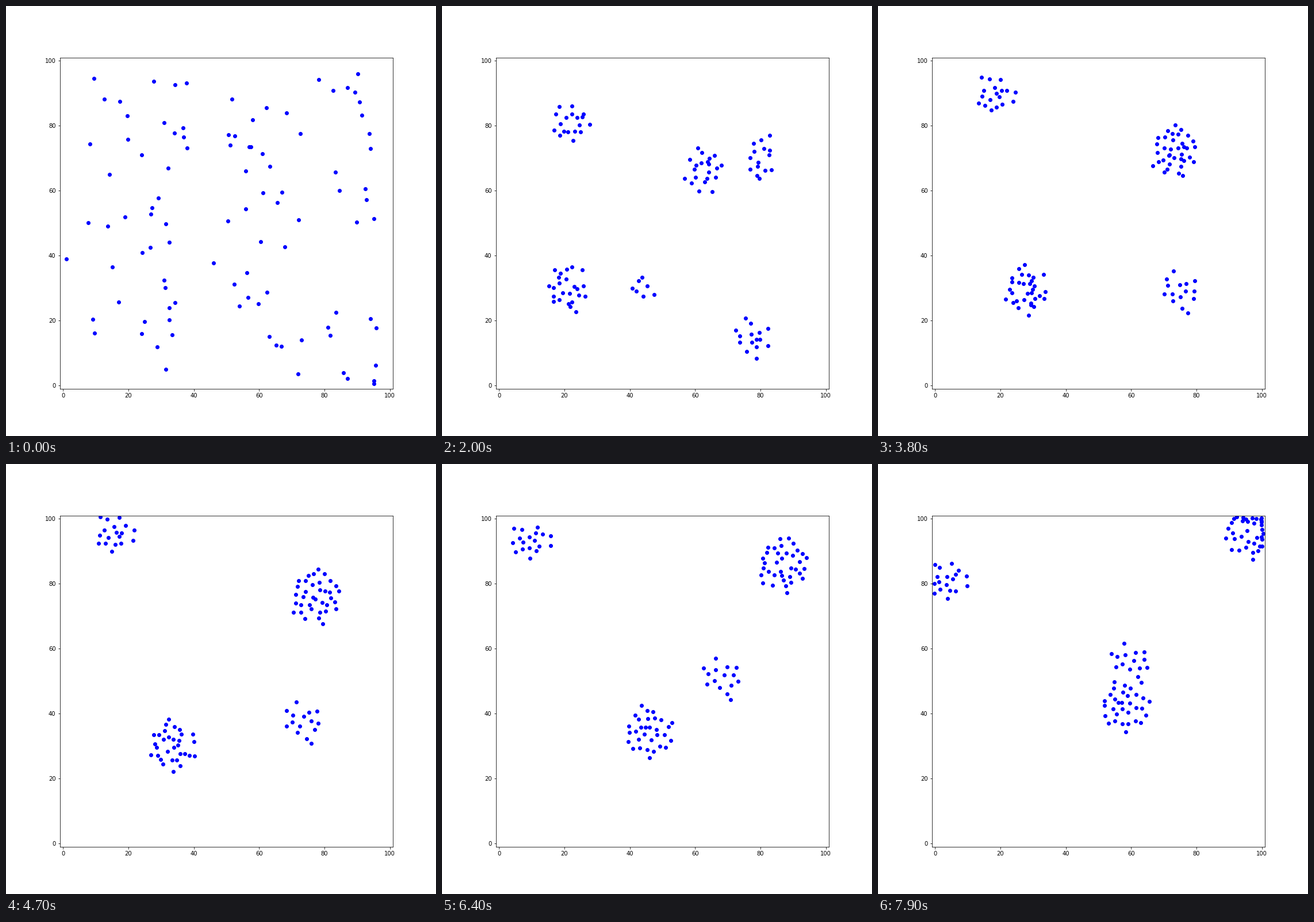
Recreate the animation shown at these times as a matplotlib script. Size 748x748 px, loop 8 s.

```python
import numpy as np
import matplotlib.pyplot as plt
from matplotlib.animation import FuncAnimation

FRAMES, INTERVAL, DPI = 80, 100, 72
MAX_SPEED, PULL, PUSH, SIGHT = 1.05, 0.12, 0.2, 12
LOW, HIGH = -0.4, 100.6

rng = np.random.default_rng(4)
frame = np.arange(FRAMES)
starts, goals = [], []


def bounce(p):
    """Mirror positions back inside the walls."""
    p = LOW + np.abs(p - LOW)
    return HIGH - np.abs(HIGH - p)


def bezier(*ctrl):
    a, b, c, d = np.array(ctrl, float)
    u = np.linspace(0, 1, FRAMES)[:, None]
    v = 1 - u
    return v**3 * a + 3 * v**2 * u * b + 3 * v * u**2 * c + u**3 * d


def flock(count, path, reach, shift=(0, 0)):
    """Boids scattered around the path's start; a shifted flock joins later."""
    fade = 1 - np.clip((frame - 10) / 28, 0, 1)
    track = path + fade[:, None] * np.array(shift)
    for _ in range(count):
        starts.append(bounce(track[0] + rng.uniform(-1, 1, 2) * reach))
        goals.append(bounce(track) + rng.normal(0, 1.3, 2))


upper_left = bezier((20, 76), (26, 76.6), (13.8, 98), (3.8, 120.5))
right = bezier((70, 68), (62, 62), (79, 77), (96.5, 96.3))
lower_left = bezier((18, 29), (15, 30), (36, 23.5), (58, 42))
lower_right = bezier((81, 12), (74, 2), (79, 57), (60.2, 55.8))

flock(18, upper_left, (19, 20))
flock(21, right, (12, 28), (-9, -2))
flock(15, right, (9, 25), (17, 3))
flock(24, lower_left, (17, 26))
flock(7, lower_left, (12, 8), (36, 2))
flock(15, lower_right, (18, 12))


def simulate():
    goal, p = np.array(goals), np.array(starts)
    path = [p]
    for i in range(FRAMES - 1):
        gap = p[:, None] - p
        d2 = (gap**2).sum(-1)
        near = (d2 > 0) & (d2 < SIGHT**2)
        push = np.where(near, PUSH / np.maximum(d2, 0.05), 0)
        v = goal[:, i + 1] - goal[:, i] + PULL * (goal[:, i] - p)
        v += (gap * push[..., None]).sum(1)
        speed = np.linalg.norm(v, axis=1, keepdims=True)
        p = bounce(p + v * np.minimum(1, MAX_SPEED / np.maximum(speed, 1e-9)))
        path.append(p)
    return path


path = simulate()
fig, ax = plt.subplots(figsize=(748 / DPI, 748 / DPI), dpi=DPI)
ax.set_xlim(-1, 101)
ax.set_ylim(-1, 101)
dots = ax.scatter(*path[0].T, c="blue")


def update(i):
    dots.set_offsets(path[i])
    return dots,


anim = FuncAnimation(fig, update, frames=FRAMES, interval=INTERVAL,
                     repeat=True, repeat_delay=0)
plt.show()
```
